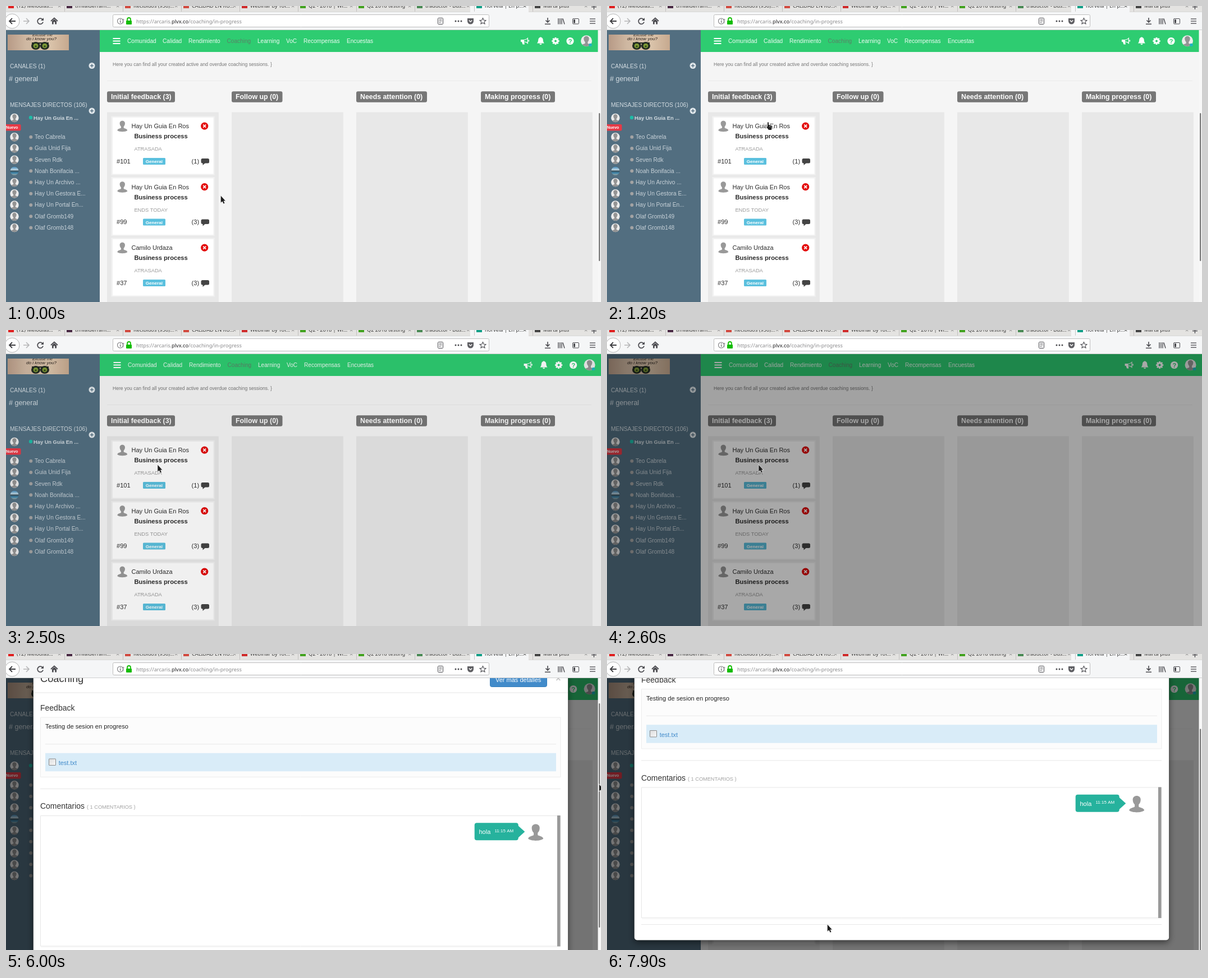
These frames come from a looping animation (1060 by 528 pixels, 8000 ms). An HTML page with a canvas:

```html
<!DOCTYPE html>
<html lang="es">
<head>
<meta charset="utf-8">
<title>Coaching</title>
<style>
html, body { margin: 0; width: 100%; height: 100%; overflow: hidden; background: #fff; }
canvas { display: block; width: 1060px; height: 528px; }
</style>
</head>
<body>
<canvas id="stage" width="1060" height="528"></canvas>
<script>
const ctx = document.getElementById('stage').getContext('2d');
const LOOP = 8000, W = 1060, H = 528, TOP = 43;
const SANS = '"Liberation Sans", Arial, sans-serif';
const UI = '"Noto Sans", "Open Sans", sans-serif';
const INK = '#4a4a4f';

// time, x, y, shape
const pointer = [
  [0, 382, 338], [300, 372, 328], [400, 352, 308], [500, 330, 285], [600, 311, 265],
  [700, 298, 252], [800, 289, 247], [900, 282, 254], [1000, 278, 264],
  [1200, 284, 207, 'hand'], [1300, 288, 199, 'hand'],
  [1500, 300, 196, 'hand'], [1600, 290, 212, 'hand'], [1700, 279, 228], [1800, 269.5, 240],
  [5600, 1056, 185], [6000, 1056, 232], [6500, 1049, 338], [7400, 484, 493], [7900, 392, 482]
];
// time, backdrop opacity
const shades = [[0, 0], [2500, 0.06], [2600, 0.34], [5600, 0.5]];
// time, modal scroll offset
const scrolls = [[0, 0], [6000, 50], [6500, 100.5]];
const at = (keys, t) => keys.filter(k => k[0] <= t).pop();

function text(s, x, y, size, color, font = SANS, weight = '') {
  ctx.font = `${weight} ${size}px ${font}`;
  ctx.fillStyle = color;
  ctx.fillText(s, x, y);
}
const bold = (s, x, y, size, color) => text(s, x, y, size, color, SANS, 'bold');

function box(x, y, w, h, color, r = 0, border) {
  ctx.beginPath();
  ctx.roundRect(x, y, w, h, r);
  if (color) { ctx.fillStyle = color; ctx.fill(); }
  if (border) { ctx.strokeStyle = border; ctx.lineWidth = 1; ctx.stroke(); }
}

function disc(x, y, r, color, border, width = 1) {
  ctx.beginPath();
  ctx.arc(x, y, r, 0, 7);
  if (color) { ctx.fillStyle = color; ctx.fill(); }
  if (border) { ctx.strokeStyle = border; ctx.lineWidth = width; ctx.stroke(); }
}

function shape(d, x, y, fill, stroke, width = 1.5) {
  const p = new Path2D(d);
  ctx.save();
  ctx.translate(x, y);
  if (fill) { ctx.fillStyle = fill; ctx.fill(p); }
  if (stroke) { ctx.strokeStyle = stroke; ctx.lineWidth = width; ctx.stroke(p); }
  ctx.restore();
}

function person(x, y, s, color) {
  ctx.save();
  ctx.translate(x, y);
  ctx.scale(s, s);
  shape('M-4.7 -5.5C-5 -12 5 -12 4.7 -5.5C4.6 -3 3.6 -1 2.4 0V2.6C4.5 4 8.6 4 9 7C5.5 10 -5.5 10 -9 7C-8.6 4 -4.5 4 -2.4 2.6V0C-3.6 -1 -4.6 -3 -4.7 -5.5Z', 0, 0, color);
  ctx.restore();
}

function avatar(x, y, r) {
  disc(x, y, r, '#ececec');
  ctx.save();
  ctx.beginPath();
  ctx.arc(x, y, r, 0, 7);
  ctx.clip();
  person(x, y + r * 0.18, r / 10, '#949494');
  ctx.restore();
}

function landscape(x, y) {
  const g = ctx.createLinearGradient(0, y - 7, 0, y + 7);
  [[0, '#4f93c0'], [0.35, '#c4dae5'], [0.5, '#38505c'], [0.75, '#3d86ad'], [1, '#8fa3a3']]
    .forEach(([p, c]) => g.addColorStop(p, c));
  disc(x, y, 7.5, g);
}

function browser() {
  box(0, 0, W, 10, '#e4e3e1');
  box(0, 10, W, 33, '#f5f6f7');
  box(0, 10, W, 0.8, '#cfcecc');
  box(827, 0, 104, 11, '#f5f6f7');
  const tabs = [
    ['(12) Melodías...', '#e02020'], ['tmvalderram...', '#4a2a45'], ['Recibidos (930)...', '#d24a40'],
    ['CALIDAD EN RU...', '#d24a40'], ['Webinar by Tor...', '#d02c2c'], ['Q2 - 2018 | Wi...', '#43a320'],
    ['Q2 2018 testing', '#43a320'], ['traductor - Bus...', '#4a8a55'], ['norvela | En p...', '#12a088'],
    ['Marta plus', '#454545']
  ];
  tabs.forEach(([name, color], i) => {
    const x = i * 104 + (i > 7 ? 2 : 0);
    box(x + 4, -6, 10, 10, color);
    text(name, x + 19, 2.5, 9.2, '#3c3c3c', UI);
    text('×', x + (i === 8 ? 87 : 92), 4, 11, i === 8 ? '#333' : '#888', UI);
    if (i) box(x, 0, 0.8, 10, '#b9b8b6');
  });
  box(1043, 1, 9, 1.3, INK);
  box(1046.8, -3, 1.3, 9, INK);
  box(0, 42, W, 1, '#cfcfcf');

  disc(11, 27, 13, '#fff', '#b4b4b4');
  shape('M6 0H-5M0 -5L-5 0L0 5', 11, 27, null, '#3d3d40', 1.8);
  shape('M-5 0H5M0 -5L5 0L0 5', 36, 27, null, '#b5b5b7', 1.6);
  shape('M4 -3A5 5 0 1 0 5 1.5', 61, 27, null, INK, 1.7);
  shape('M6 -6V-1H1Z', 61, 27, INK);
  shape('M-6 0L0 -5.5L6 0', 86, 27, null, INK, 1.7);
  shape('M-4 0L0 -3.5L4 0V5.5H1.3V1.5H-1.3V5.5H-4Z', 86, 27, INK);

  box(190.5, 15.5, 670, 22, '#fff', 2, '#bdbdbd');
  disc(203.5, 27, 5, null, '#77777a', 1.1);
  box(203, 26, 1.2, 4, '#66666a');
  box(203, 23.6, 1.2, 1.3, '#66666a');
  shape('M0 -4V4M-1.5 -2L0 -4L1.5 -2', 209, 27, null, '#88888b', 0.8);
  box(214, 26, 10, 7, '#12bc00', 1);
  shape('M-3 0V-2A3 3 0 0 1 3 -2V0', 219, 26, null, '#12bc00', 1.8);
  const gray = '#8a8a8c';
  text('https://arcaris.', 232, 30.5, 9.2, gray, UI);
  let x = 232 + ctx.measureText('https://arcaris.').width;
  text('plvx.co', x, 30.5, 9.2, '#1c1c1e', UI);
  x += ctx.measureText('plvx.co').width;
  text('/coaching/in-progress', x, 30.5, 9.2, gray, UI);

  box(769.5, 21.5, 9, 11, '#fff', 1, INK);
  [24, 26.5, 29].forEach((y, i) => box(771.5, y, i < 2 ? 5 : 3, 0.8, INK));
  [801, 806, 811].forEach(cx => disc(cx, 27, 1.5, INK));
  shape('M-5.5 -5H5.5V0A5.5 5.5 0 0 1 -5.5 0Z', 827.5, 27, '#5f5f63');
  shape('M-2.7 -1.5L0 1.2L2.7 -1.5', 827.5, 27, null, '#fff', 1.4);
  shape('M0 -5.5L1.7 -1.8L5.5 -1.4L2.7 1.2L3.5 5L0 3L-3.5 5L-2.7 1.2L-5.5 -1.4L-1.7 -1.8Z', 849.5, 27, null, INK, 1.1);
  shape('M0 -6V2M-3.5 -1.5L0 2L3.5 -1.5M-5 5.3H5', 965, 27, null, INK, 1.6);
  shape('M-5 -5V5.5M-2 -5V5.5M1 -5V5.5M3 -4.5L6 5.5', 989, 27, null, INK, 1.4);
  box(1009.5, 22.5, 11, 9.5, null, 1.5, INK);
  box(1011, 24, 3, 6.5, INK);
  [23, 27, 31].forEach(y => box(1040, y - 0.6, 10, 1.3, INK));
}

function banner() {
  const g = ctx.createLinearGradient(3, 0, 112, 0);
  [[0, '#b79a86'], [0.3, '#cfb8a2'], [0.7, '#dac3aa'], [1, '#c6a98f']].forEach(([p, c]) => g.addColorStop(p, c));
  ctx.save();
  ctx.beginPath();
  ctx.rect(3, 51, 109, 28);
  ctx.clip();
  box(3, 51, 109, 28, g);
  text('Excuse me', 47, 54, 7.3, '#2d2520', SANS, 'italic');
  text('do i know you?', 36, 61.3, 8.1, '#2d2520', SANS, 'italic');
  [53, 69].forEach(x => {
    ctx.beginPath();
    ctx.ellipse(x, 71, 8, 7, 0, 0, 7);
    ctx.fillStyle = '#222b22';
    ctx.fill();
    disc(x, 71, 4.4, '#7d9a35');
    disc(x, 72, 1.8, '#35461f');
  });
  box(46, 65, 30, 2, '#222b22');
  ctx.restore();
}

function addButton(y) {
  disc(153, y, 5.5, '#dfe6ea');
  box(150, y - 0.7, 6, 1.4, '#526e80');
  box(152.3, y - 3, 1.4, 6, '#526e80');
}

function sidebar() {
  const pale = '#d3dce1';
  box(0, TOP, 167, H - TOP, '#526e80');
  banner();
  text('CANALES (1)', 7, 110.5, 10.2, pale);
  addButton(106.5);
  text('# general', 5, 134, 12.5, pale);
  text('MENSAJES DIRECTOS (106)', 7, 180, 10.25, pale);
  addButton(187);
  avatar(15, 199.5, 7.7);
  disc(44, 199, 3.2, '#1fbba6');
  bold('Hay Un Guia En ...', 49, 202.5, 9.3, pale);
  box(0, 211, 26.5, 11.5, '#e63946', [0, 2, 2, 0]);
  bold('Nuevo', 0, 219.3, 7, '#fff');
  const people = ['Teo Cabrela', 'Guia Unid Fija', 'Seven Rdk', 'Noah Bonifacia ...', 'Hay Un Archivo ...',
    'Hay Un Gestora E...', 'Hay Un Portal En...', 'Olaf Gromb149', 'Olaf Gromb148'];
  people.forEach((name, i) => {
    const y = 233.7 + 20.22 * i;
    if (i === 3) landscape(15, y); else avatar(15, y, 7.7);
    disc(44.3, y, 3, '#a3a3a3');
    text(name, 51, y + 3.4, 10.15, '#c8d2d8');
  });
}

function navbar(wide) {
  const dx = wide ? 1 : 0, light = '#effbf4';
  box(167, TOP, W - 167, 39, '#2ecc71');
  [58, 62.5, 67].forEach(y => box(190.5 + dx, y - 1, 13, 2, '#fff'));
  const items = [['Comunidad', 216], ['Calidad', 279], ['Rendimiento', 325], ['Coaching', 393.5],
    ['Learning', 448], ['VoC', 499], ['Recompensas', 530], ['Encuestas', 607]];
  items.forEach(([s, x], i) => text(s, x + dx, 66, 10.1, i === 3 ? '#5b7f67' : light));

  ctx.save();
  if (wide) ctx.translate(5.6, 0);
  shape('M-7 -2H-2C2 -2 4 -4 6 -6V6C4 4 2 2.5 -1 2.3L0 6.5H-3.5L-5 2H-7Z', 924, 62, '#fff');
  shape('M-1 -1C2 -1 3.5 -2.3 4.7 -3.4V3.2C3.5 2.2 2 1.3 -1 1.2Z', 924, 62, '#2ecc71');
  box(930.5, 60.5, 1.6, 3, '#fff');
  shape('M-6.5 4.5C-4 2 -4.5 -1 -4 -3C-3.5 -5 -2 -6 0 -6.8C2 -6 3.5 -5 4 -3C4.5 -1 4 2 6.5 4.5ZM-2 5.3H2A2 2 0 0 1 -2 5.3Z', 952.5, 62, '#fff');
  for (let i = 0; i < 4; i++) {
    ctx.save();
    ctx.translate(979, 62.5);
    ctx.rotate(i * Math.PI / 4);
    box(-1.5, -6.6, 3, 13.2, '#fff', 0.5);
    ctx.restore();
  }
  disc(979, 62.5, 4.9, '#fff');
  disc(979, 62.5, 2, '#2ecc71');
  disc(1005, 62.5, 6.6, '#fff');
  bold('?', 1001.8, 66.5, 11, '#2ecc71');
  avatar(1034, 62.3, 10);
  disc(1041, 69.5, 2.8, '#1fb5c0');
  ctx.restore();
}

function card(y, name, state, id, count) {
  ctx.save();
  ctx.translate(0, y);
  box(187.5, -1.5, 184, 105, '#f1f1f1');
  box(190, 1, 179.5, 100.5, '#fff');
  person(207.3, 17, 1, '#999');
  text(name, 223.5, 20.2, 11.05, '#2b2b2b');
  disc(353.7, 16.2, 6.6, '#e30b0b');
  shape('M-2.5 -2.5L2.5 2.5M2.5 -2.5L-2.5 2.5', 353.7, 16.2, null, '#fff', 1.7);
  bold('Business process', 228.4, 38.2, 11.15, '#2b2b2b');
  text(state, 228.4, 60, 9.3, '#9a9a9a');
  text(id, 197, 82.5, 11.1, '#2b2b2b');
  box(244, 73, 40, 12, '#5bc0de', 1.5);
  bold('General', 248.8, 82, 8.1, '#fff');
  text(`(${count})`, 330.6, 82.5, 11, '#2b2b2b');
  box(347.5, 74, 14.5, 8.5, '#444', 2.5);
  shape('M0 0V4L4.5 0Z', 350.5, 82, '#444');
  ctx.restore();
}

function page(wide) {
  box(167, 82, W - 167, H - 82, '#f5f5f5');
  navbar(wide);
  sidebar();
  text('Here you can find all your created active and overdue coaching sessions. }', 190, 107, 8.6, '#777');
  box(180, 133, 863, 1, '#ebebeb');
  const columns = [['Initial feedback (3)', 121], ['Follow up (0)', 90.5], ['Needs attention (0)', 126], ['Making progress (0)', 132]];
  columns.forEach(([title, w], i) => {
    const x = 180 + i * 222;
    box(x, 152.3, w, 19.4, '#777', 3);
    bold(title, x + 7, 166, 12.35, '#fff');
    box(x, 189.5, 198.8, H - 189.5, '#e8e8e8');
  });
  card(198, 'Hay Un Guia En Ros', 'ATRASADA', '#101', 1);
  card(306.5, 'Hay Un Guia En Ros', 'ENDS TODAY', '#99', 3);
  card(415, 'Camilo Urdaza', 'ATRASADA', '#37', 3);
}

function scrollbar(y, h) {
  box(1054.5, TOP, 5.5, H - TOP, '#f7f7f7');
  box(1056.2, y, 2, h, '#686868', 1);
}

function modal(offset) {
  ctx.save();
  ctx.beginPath();
  ctx.rect(0, TOP, 1054.5, H - TOP);
  ctx.clip();
  ctx.translate(0, -offset);
  ctx.shadowColor = 'rgba(0,0,0,.5)';
  ctx.shadowBlur = 12;
  ctx.shadowOffsetY = 4;
  box(48.7, 67, 952.5, 544, '#fff', 5);
  ctx.shadowColor = 'transparent';
  box(48.5, 66.7, 953, 544.5, null, 5, 'rgba(0,0,0,.2)');

  text('Coaching', 61, 99.5, 18.3, '#333');
  box(862.5, 83.5, 101, 25, '#428bca', 3, '#357ebd');
  text('Ver mas detalles', 872, 100, 11, '#fff');
  bold('×', 979.3, 98.5, 16, '#c4c4c4');
  box(49, 118.5, 952, 1, '#e5e5e5');

  text('Feedback', 61, 151, 14, '#333');
  box(61.5, 163, 926.5, 106.5, '#fcfcfc', 0, '#ededed');
  text('Testing de sesion en progreso', 70, 183.2, 11.1, '#222');
  box(70, 210.3, 910, 1, '#e8e8e8');
  box(70, 226.7, 910, 32.6, '#d9ecf8');
  const g = ctx.createLinearGradient(76, 237, 88, 249);
  g.addColorStop(0, '#dcdcdc');
  g.addColorStop(1, '#f8f8f8');
  box(76.5, 237, 12, 11.5, g, 0.5, '#8b8b8b');
  text('test.txt', 93.7, 248.2, 11, '#428bca');
  box(61, 290, 927, 1, '#e8e8e8');

  text('Comentarios', 61, 326.3, 13.95, '#333');
  text('( 1 COMENTARIOS )', 144, 326.3, 9.2, '#a2a2a2');
  box(61.5, 338.5, 926.5, 232.5, '#fff', 0, '#e6e6e6');
  box(62, 572.5, 926, 0.8, '#f0f0f0');
  box(982, 338, 5.5, 233.5, '#999');
  box(834.7, 351.2, 78, 31, '#26b29d', 4);
  shape('M-1 -12L12.3 0L-1 12Z', 912, 367, '#26b29d');
  text('hola', 842.5, 371, 11, '#fff');
  text('11:15 AM', 870.5, 367.8, 8, '#fff');
  person(943.7, 369, 1.5, '#999');
  box(61, 582.5, 927, 1, '#e8e8e8');
  ctx.restore();
}

function arrow(x, y) {
  const d = 'M0.8 0.8V12.6L3.5 10.2L5.6 14.6L7.4 13.8L5.4 9.5H8.7Z';
  shape(d, x, y, null, '#e8e8e8', 1.4);
  shape(d, x, y, '#1c1c1c');
}

function hand(x, y) {
  const d = 'M2 1.2C2 0 4 0 4 1.2V5L9 6.2C10 6.5 10 7.5 9.8 9L9 14H4L0.5 9.5C-0.3 8.3 1 7.6 2 8.6Z';
  shape(d, x, y, null, '#fff', 1.8);
  shape(d, x, y, '#222');
  shape('M5.5 7V9M7.5 7.4V9.2', x, y, null, '#ddd', 0.6);
}

function draw(t) {
  const shade = at(shades, t)[1], offset = at(scrolls, t)[1], open = t >= 5600;
  ctx.clearRect(0, 0, W, H);
  page(shade > 0);
  if (shade) box(0, TOP, W, H - TOP, `rgba(0,0,0,${shade})`);
  if (open) {
    modal(offset);
    scrollbar(TOP + offset * 0.9, 400);
  } else if (!shade) {
    scrollbar(191, 264);
  }
  browser();
  const [, x, y, kind] = at(pointer, t);
  (kind === 'hand' ? hand : arrow)(x, y);
}

const start = performance.now();
function tick(now) {
  draw(Math.max(0, now - start) % LOOP);
  requestAnimationFrame(tick);
}
tick(start);
</script>
</body>
</html>
```
